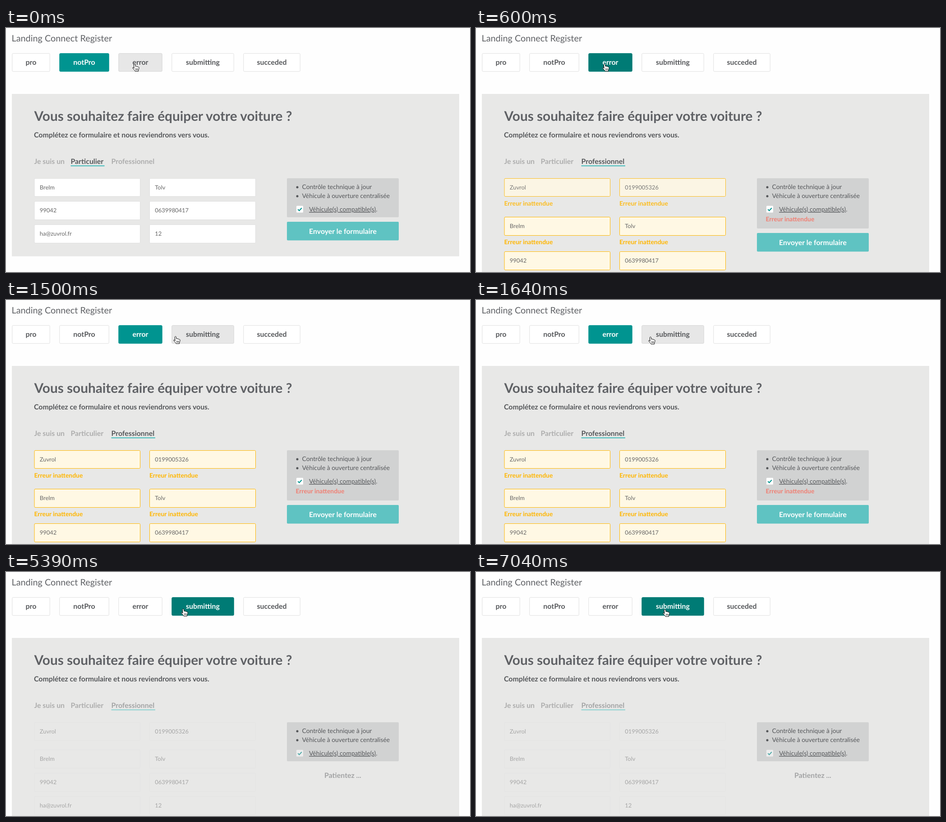
Recreate the animation shown at these times as an HTML page. Size 1029 by 544 pixels, loop 8 s.

```html
<!DOCTYPE html>
<html lang="fr">
<head>
<meta charset="utf-8">
<title>Landing Connect Register</title>
<style>
html, body { margin: 0; width: 100%; height: 100%; overflow: hidden; background: #fefefe; }
svg { display: block; width: 100vw; height: 100vh; }
text { font-family: Lato, "Open Sans", sans-serif; white-space: pre; text-rendering: geometricPrecision; }
</style>
</head>
<body>
<svg id="stage" viewBox="0 0 1029 544"></svg>
<script>
const LOOP = 8000, ERROR_AT = 150, SUBMIT_AT = 3740, LEAVE_AT = 1500;
const ZOOM = .992; // the 1000 px wide panel is shown 992 px wide
const INK = '#5f6165', DARK = '#55575a', GREY = '#adadad', PANEL = '#e8e8e7';
const TEAL = '#009490', DEEP = '#007b75', AQUA = '#5fc3c2', AMBER = '#ffb600';

// Cursor stops: start time, left, top
const STOPS = [
  [0, 280, 79], [1200, 286, 79], [1350, 320, 78], [1500, 371, 80], [1640, 382, 81],
  [5390, 388, 81], [5540, 388, 82], [6890, 389, 82], [7040, 414, 82]
];
const BUTTONS = [
  ['pro', 13, 98], ['notPro', 118, 229], ['error', 249, 347],
  ['submitting', 367, 506], ['succeded', 526, 653]
];
const COMPANY = ['Zuvrol', '0199005326'];
const PERSON = [['Brelm', 'Tolv'], ['99042', '0639980417'], ['ha@zuvrol.fr', '12']];

const text = (s, x, y, size, fill, more = '') =>
  `<text x="${x}" y="${y}" font-size="${size * ZOOM}" fill="${fill}" ${more}>${s}</text>`;
const bold = (s, x, y, size, fill, more = '') =>
  text(s, x, y, size, fill, 'font-weight="700" ' + more);
const rect = (x, y, w, h, fill, r = 0) =>
  `<rect x="${x}" y="${y}" width="${w}" height="${h}" rx="${r}" fill="${fill}"/>`;
const framed = (x, y, w, h, fill, line) =>
  `<rect x="${x + .5}" y="${y + .5}" width="${w - 1}" height="${h - 1}" rx="2" fill="${fill}" stroke="${line}"/>`;
const group = (s, opacity) => `<g opacity="${opacity}">${s}</g>`;

function buttons(active, hover) {
  return BUTTONS.map(([label, x1, x2], i) => {
    let fill = '#fff', line = '#dfdfdf', ink = DARK;
    if (i === active) {
      fill = line = i === hover ? DEEP : TEAL;
      ink = '#fff';
    } else if (i === hover) {
      fill = '#e7e7e7';
      line = '#d6d6d6';
    }
    return framed(x1 + .3, 56.2, x2 - x1 - .6, 41.2, fill, line) +
      bold(label, (x1 + x2) / 2, 82, 16, ink, 'text-anchor="middle"');
  }).join('');
}

function tabs(pro, off) {
  const tab = (label, x, w, on) =>
    bold(label, x, 303, 16, on ? (off ? '#a3a4a5' : DARK) : GREY) +
    (on ? rect(x, 306, w, 2.5, off ? '#9cd5d4' : AQUA) : '');
  return bold('Je suis un', 62.5, 303, 16, GREY) +
    tab('Particulier', 143.5, 75, !pro) + tab('Professionnel', 233.5, 97.5, pro);
}

function row(values, y, failed, off) {
  const top = Math.round(y), height = Math.round(y + 41.6) - top;
  const [fill, line, ink] = off ? [PANEL, '#e3e3e3', '#a5a5a5']
    : failed ? ['#fff8e4', AMBER, '#666'] : ['#fff', '#dfdfdf', '#666'];
  return values.map((value, i) => {
    const x = i ? 318 : 62.5, w = i ? 236 : 235.5;
    return framed(x, top, w, height, fill, line) +
      text(value, x + 12.3, top + 25, 13, ink) +
      (failed ? bold('Erreur inattendue', x, top + 61, 14, AMBER) : '');
  }).join('');
}

function fields(pro, failed, off, fade) {
  const pitch = failed ? 76.6 : 51.6;
  let y = 334.8, out = '';
  if (pro) {
    out += group(row(COMPANY, y, failed, off), fade);
    y += pitch + 10;
  }
  for (const values of PERSON) {
    out += row(values, y, failed, off);
    y += pitch;
  }
  return out;
}

function side(failed, off) {
  const extra = failed ? 25 : 0;
  const bullet = (s, y) =>
    `<circle cx="646" cy="${y - 4}" r="2.5" fill="${DARK}"/>` + text(s, 656.5, y, 14, DARK);
  const box = rect(644, 396.5, 15, 15, '#fff', 1.5) +
    `<path d="M647.3 404.2l3 3 5.5-6" fill="none" stroke="${TEAL}" stroke-width="2"/>`;
  const send = off
    ? bold('Patientez ...', 747, 459, 16, '#a2a3a4', 'text-anchor="middle"')
    : rect(623, 432 + extra, 248, 41.6, AQUA, 2) +
      bold('Envoyer le formulaire', 747, 459 + extra, 16, '#fff', 'text-anchor="middle"');
  return rect(623, 335, 248, 87 + extra, '#d1d2d2', 2) +
    bullet('Contrôle technique à jour', 359) +
    bullet('Véhicule à ouverture centralisée', 379) +
    group(box, off ? .6 : 1) +
    text('<tspan text-decoration="underline">Véhicule(s) compatible(s)</tspan>.', 672, 409, 14, DARK) +
    (failed ? bold('Erreur inattendue', 642.5, 431, 14, '#f07f73') : '') + send;
}

function cursor(t) {
  const [, x, y] = STOPS.filter(stop => stop[0] <= t).pop();
  return `<g transform="translate(${x} ${y})" stroke="#000" stroke-linejoin="round" stroke-linecap="round">
    <path fill="#fff" d="M4 10.6L3.4 3C3.2 1.1 5.8 .4 6.3 2.4L7.2 6.7C8 5.6 9.5 5.8 9.9 7.1
      C10.8 6.3 12.2 6.7 12.4 7.9C13.6 7.2 15 7.9 15 9.5C15.2 12.3 13.8 13.2 13.6 15.6V17.3H6.2
      C5.8 15.3 3 13.4 1 10.6C.2 9.2 1.8 8.3 3 9.5Z"/>
    <path fill="none" stroke-width=".8" d="M7.6 11.5l.2 3.3M9.8 11.4v3.4M11.9 11.4v3.4"/></g>`;
}

function scene(t) {
  const pro = t >= ERROR_AT, off = t >= SUBMIT_AT, failed = pro && !off;
  const active = off ? 3 : pro ? 2 : 1;
  const hover = t < LEAVE_AT ? 2 : 3;
  // The company row appears in visible steps of 150 ms
  const step = Math.floor(t / 150) * 150;
  const left = 1 - Math.min(1, Math.max(0, (step - 125) / 750));
  const fade = off ? 1 : 1 - left * left;
  return text('Landing Connect Register', 12.5, 30, 20, INK) +
    buttons(active, hover) +
    rect(13, 147, 992, pro ? 400 : 362, PANEL) +
    bold('Vous souhaitez faire équiper votre voiture ?', 62.5, 206.5, 30, INK) +
    bold('Complétez ce formulaire et nous reviendrons vers vous.', 62, 244, 16, DARK) +
    tabs(pro, off) + fields(pro, failed, off, fade) + side(failed, off) + cursor(t);
}

const stage = document.getElementById('stage');
const start = performance.now();
let shown = '';
function draw() {
  const next = scene((performance.now() - start) % LOOP);
  if (next !== shown) stage.innerHTML = shown = next;
  requestAnimationFrame(draw);
}
draw();
</script>
</body>
</html>
```
